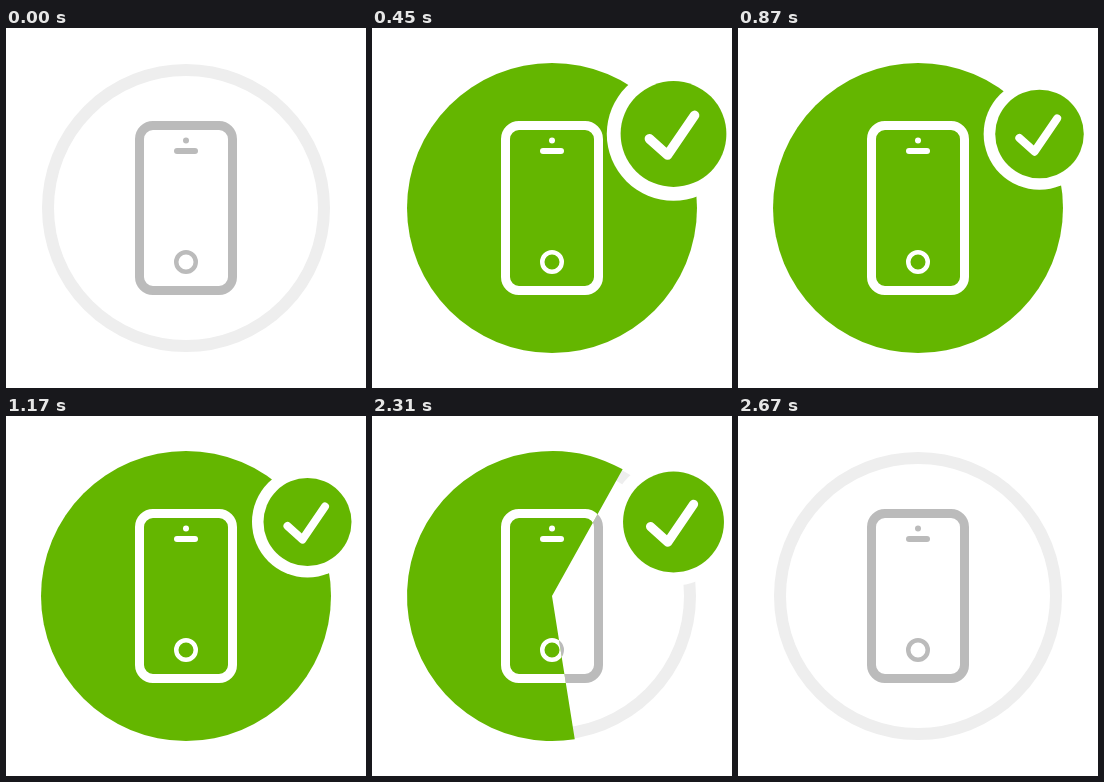
An HTML page with a canvas for the animation above (3.6 s loop, 360x360 px).

```html
<!DOCTYPE html>
<html lang="en">
<head>
<meta charset="utf-8">
<title>Phone check</title>
<style>
  html, body { margin: 0; width: 100%; height: 100%; overflow: hidden; background: #fff; }
  canvas { display: block; width: 100vmin; height: 100vmin; }
</style>
</head>
<body>
<canvas id="stage"></canvas>
<script>
const SIZE = 360, LOOP = 3600, STEP = 30;
const TAU = Math.PI * 2, DEG = TAU / 360;
const GREEN = '#64b600', GRAY = '#bbbbbb', PALE = '#eeeeee', WHITE = '#ffffff';
const C = 180;

const canvas = document.getElementById('stage');
const ctx = canvas.getContext('2d');

function resize() {
  const side = Math.min(innerWidth, innerHeight) * (devicePixelRatio || 1);
  canvas.width = canvas.height = Math.max(1, Math.round(side));
}

const progress = (t, start, length) => Math.min(1, Math.max(0, (t - start) / length));
const sineInOut = p => (1 - Math.cos(Math.PI * p)) / 2;
const elasticOut = p => p <= 0 ? 0 : 1 + 2 ** (-10 * p) * Math.sin((p - 0.075) * TAU / 0.3);
const backIn = (p, s) => p * p * ((s + 1) * p - s);

function disc(x, y, r, color) {
  ctx.fillStyle = color;
  ctx.beginPath();
  ctx.arc(x, y, r, 0, TAU);
  ctx.fill();
}

function ring(x, y, r, width, color) {
  ctx.strokeStyle = color;
  ctx.lineWidth = width;
  ctx.beginPath();
  ctx.arc(x, y, r, 0, TAU);
  ctx.stroke();
}

function line(points, width, color) {
  ctx.strokeStyle = color;
  ctx.lineWidth = width;
  ctx.lineCap = ctx.lineJoin = 'round';
  ctx.beginPath();
  points.forEach(([x, y]) => ctx.lineTo(x, y));
  ctx.stroke();
}

function phone(color) {
  ctx.strokeStyle = color;
  ctx.lineWidth = 9;
  ctx.beginPath();
  ctx.roundRect(133.5, 97.5, 93, 165, 13.5);
  ctx.stroke();
  disc(C, 112.5, 3, color);
  line([[171, 123], [189, 123]], 6, color);
  ring(C, 234, 9.75, 4.5, color);
}

// Green pie with a white phone; angles in degrees clockwise from the top.
function pie(from, to) {
  if (to - from < 0.01) return;
  ctx.save();
  ctx.beginPath();
  if (to - from > 359.99) {
    ctx.arc(C, C, 145, 0, TAU);
  } else {
    ctx.moveTo(C, C);
    ctx.arc(C, C, 145, (from - 90) * DEG, (to - 90) * DEG);
    ctx.closePath();
  }
  ctx.fillStyle = GREEN;
  ctx.fill();
  ctx.clip();
  phone(WHITE);
  ctx.restore();
}

function badge(scale) {
  if (scale <= 0) return;
  ctx.save();
  ctx.translate(301.5, 106);
  ctx.scale(scale, scale);
  disc(0, 0, 55.5, WHITE);
  disc(0, 0, 44, GREEN);
  line([[-20, 4], [-5, 17.5], [17.5, -15.5]], 8, WHITE);
  ctx.restore();
}

function badgeScale(t) {
  if (t < 1170) return elasticOut(progress(t, 356, 1000));
  return 1 - backIn(progress(t, 2104, 560), 2.3);
}

function draw(t) {
  const k = canvas.width / SIZE;
  ctx.setTransform(k, 0, 0, k, 0, 0);
  ctx.fillStyle = WHITE;
  ctx.fillRect(0, 0, SIZE, SIZE);

  ring(C, C, 138, 12, PALE);
  phone(GRAY);

  const fill = sineInOut(progress(t, 0, 291));
  const wipe = sineInOut(progress(t, 2110, 463));
  const turn = 74 * wipe;
  pie(turn + 360 * wipe, turn + 360 * fill);

  badge(badgeScale(t));
}

const begin = performance.now();

function tick() {
  const t = (performance.now() - begin) % LOOP;
  draw(Math.floor(t / STEP) * STEP);
  requestAnimationFrame(tick);
}

addEventListener('resize', resize);
resize();
tick();
</script>
</body>
</html>
```
